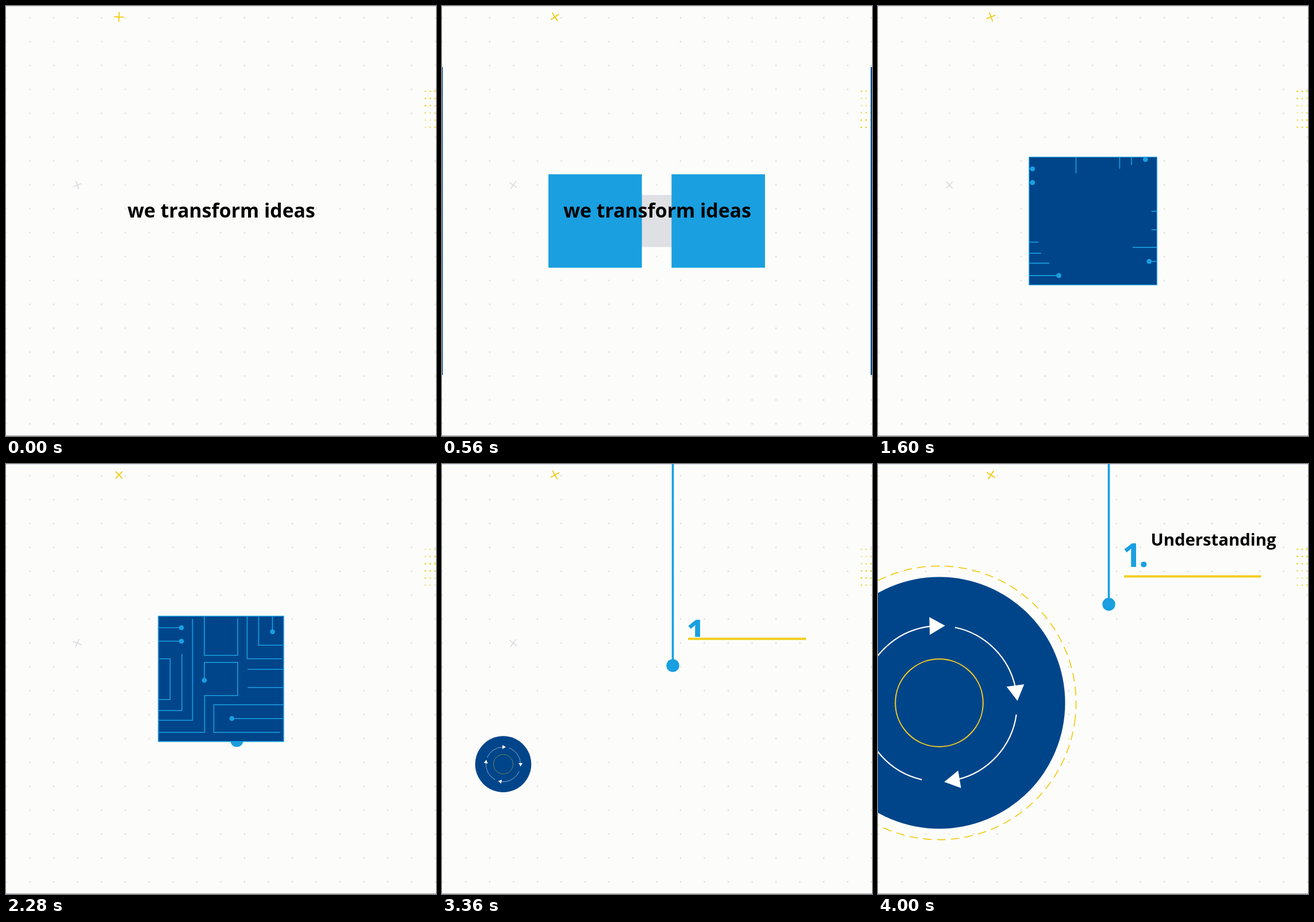
Recreate the animation shown at these times as an HTML page. Size 748 px wide and 748 px high, loop 4.04 s.

```html
<!DOCTYPE html>
<html lang="en">
<head>
<meta charset="utf-8">
<title>We transform ideas</title>
<style>
html, body { margin: 0; width: 100%; height: 100%; overflow: hidden; background: #fcfdfb; }
svg { display: block; width: 100vw; height: 100vh; }
text { font-family: "Open Sans", "Noto Sans", sans-serif; font-weight: 700; }
.dark { fill: #00458a; }
.sky { fill: #1a9fe0; }
.grey { fill: #dfe0e3; }
.trace { fill: none; stroke: #1a9fe0; stroke-width: 1.6; }
.gold { fill: none; stroke: #f3cd22; stroke-width: 2; }
.white { fill: none; stroke: #fff; stroke-width: 2.2; }
</style>
</head>
<body>
<svg viewBox="0 0 748 748">
  <defs>
    <pattern id="grid" x="-20.75" y="0" width="41.5" height="41.55" patternUnits="userSpaceOnUse">
      <circle cx="20.75" cy="20.5" r="1.6" fill="#e3e4dc"/>
    </pattern>
    <clipPath id="above"><rect x="420" y="740" width="60" height="114"/></clipPath>
  </defs>
  <rect width="748" height="748" fill="#fcfdfb"/>
  <rect width="748" height="748" fill="url(#grid)"/>
  <rect width="748" height="1" fill="#d3d3ee"/>
  <rect y="747" width="748" height="1" fill="#98989e"/>
  <path id="plusGold" class="gold" d="M-8.5 0H8.5M0-8.5V8.5"/>
  <path id="plusGrey" fill="none" stroke="#dcdde1" stroke-width="1.7" d="M-8 0H8M0-8V8"/>
  <g id="matrix" fill="#ecd43a"></g>
  <g id="squares"></g>
  <g id="world">
    <path id="stem" fill="none" stroke="#1a9fe0" stroke-width="3.6"/>
    <circle id="ball" class="sky" cx="401.5" r="11.2"/>
    <g id="chip">
      <rect id="board" class="dark" x="-109" y="-109" width="218" height="218" stroke="#1a9fe0"/>
      <g id="traces" transform="translate(-109 -109)"></g>
    </g>
    <rect id="rule" x="428" height="4" fill="#f3cd22"/>
    <g clip-path="url(#above)">
      <text id="number" class="sky" x="425" font-size="58" letter-spacing="-4">1.</text>
    </g>
    <text id="title" x="474.5" y="801.5" font-size="29.3"></text>
    <g id="wheel">
      <circle id="ring" class="gold" stroke-dasharray="15 9" style="stroke-width:1.8"/>
      <g id="disc">
        <circle class="dark" r="219"/>
        <circle class="gold" r="76.3"/>
        <g id="arrows"></g>
      </g>
    </g>
  </g>
  <text id="slogan" text-anchor="middle" y="12" font-size="33.8">we transform ideas</text>
</svg>
<script>
const LOOP = 4040, STEP = 40;
const $ = id => document.getElementById(id);

function set(el, attrs) {
  for (const key in attrs) el.setAttribute(key, attrs[key]);
  return el;
}
function add(parent, tag, attrs) {
  const el = document.createElementNS("http://www.w3.org/2000/svg", tag);
  parent.appendChild(set(el, attrs));
  return el;
}

const span = (t, from, to) => Math.min(1, Math.max(0, (t - from) / (to - from)));
const outCubic = u => 1 - (1 - u) ** 3;
const inOutCubic = u => u < .5 ? 4 * u ** 3 : 1 - 4 * (1 - u) ** 3;
const inOutSine = u => (1 - Math.cos(Math.PI * u)) / 2;
const outExpo = u => u < 1 ? 1 - 2 ** (-10 * u) : 1;
const outBack = u => 1 + 2.2 * (u - 1) ** 3 + 1.2 * (u - 1) ** 2;

// Pairs of squares fly in from both sides, one colour after another
const pairs = ["grey", "sky", "dark"].map((name, i) => ({
  end: 773 + 275 * i,
  sides: [-1, 1].map(side => ({ side, el: add($("squares"), "rect", { class: name }) }))
}));

// Circuit traces; those flagged carry a dot at the growing end
const traces = [
  ["M0 20H41", 1], ["M0 43.5H41", 1],
  ["M0 181H59.5V0"], ["M0 145H20.5V74H0"], ["M0 164H41V63"],
  ["M80 0V68H138V0"],
  ["M0 202H80.5V138H138V80.5H80V118.5", 1],
  ["M154.5 0V74H218"], ["M174.5 0V50.5H218"], ["M198.5 0V27.5", 1],
  ["M218 92.5H154"], ["M218 124H154"],
  ["M218 154H96.5V202H218"], ["M218 178H126", 1]
].map(([d, dotted]) => {
  const path = add($("traces"), "path", { d, class: "trace", pathLength: 1 });
  const dot = dotted && add($("traces"), "circle", { r: 4.3, class: "sky" });
  return { path, dot, length: path.getTotalLength() };
});

const cells = [];
for (let row = 0; row < 6; row++)
  for (let col = 0; col < 3; col++)
    cells.push({ row, col, el: add($("matrix"), "circle", { cx: 729.5 + 8.3 * col, cy: 148.3 + 12.5 * row, r: 1.6 }) });

// Four curved arrows: start angle and tip angle
const polar = (deg, r) => [r * Math.cos(deg * Math.PI / 180), r * Math.sin(deg * Math.PI / 180)];
for (const [start, tip] of [[-118, -41.4], [-31.6, 47], [63.3, 147], [157, 235]]) {
  const r = 135.5, middle = tip - 6;
  add($("arrows"), "path", { class: "white", d: `M${polar(start, r)}A${r} ${r} 0 0 1 ${polar(tip - 10, r)}` });
  add($("arrows"), "path", { fill: "#fff", d: "M-15.5-13.5H15.5L0 13.5Z", transform: `rotate(${middle}) translate(${r} 0)` });
}

function drawBackground(t) {
  const turn = t * .0978;
  set($("plusGold"), { transform: `translate(196.5 19) rotate(${2 + turn})` });
  set($("plusGrey"), { transform: `translate(124 311.5) rotate(${70 + turn})` });
  for (const { row, col, el } of cells)
    set(el, { opacity: .72 + .28 * Math.sin(t / 210 + row * 1.1 + col * .6) });
}

function drawSquares(t) {
  set($("squares"), { display: t < 1323 ? "inline" : "none" });
  for (const { end, sides } of pairs) {
    const offset = 640 * (Math.max(0, end - t) / 763) ** 4;
    const size = 87.6 + .7 * offset;
    for (const { side, el } of sides)
      set(el, { x: 373.5 + side * offset - size / 2, y: 374 - size / 2, width: size, height: size });
  }
  const scale = 1 - span(t, 600, 1210) ** 3;
  set($("slogan"), { transform: `translate(374.5 356) scale(${scale})` });
}

function drawChip(t) {
  const scale = .402 + .598 * outBack(span(t, 1300, 1680));
  set($("chip"), { display: t < 1323 ? "none" : "inline", transform: `translate(374 374) scale(${scale})` });
  set($("board"), { "stroke-width": 1.6 * span(t, 1450, 1650) });
  const grown = outCubic(span(t, 1550, 2550));
  set($("traces"), { display: grown > 0 ? "inline" : "none" });
  for (const { path, dot, length } of traces) {
    set(path, { "stroke-dasharray": `${grown} 2` });
    if (dot) {
      const p = path.getPointAtLength(length * grown);
      set(dot, { cx: p.x, cy: p.y });
    }
  }
}

function drawStep(t) {
  const scroll = 660 * inOutCubic(span(t, 2198, 3967));
  set($("world"), { transform: `translate(0 ${-scroll})` });

  const ballY = 457 + 447 * inOutSine(span(t, 2160, 2960));
  const shown = t >= 2160 ? "inline" : "none";
  set($("ball"), { cy: ballY, display: shown });
  set($("stem"), { d: `M401.5 450V${ballY}`, display: shown });

  set($("rule"), {
    y: 853.5 + 90 * (1 - outCubic(span(t, 2950, 3520))),
    width: t < 2960 ? 0 : 3 + 235.5 * inOutCubic(span(t, 2950, 3560))
  });
  set($("number"), { y: 839 + 60 * (1 - outCubic(span(t, 3220, 3800))) });
  $("title").textContent = "Understanding".slice(0, Math.max(0, Math.floor((t - 3360) / 40)));

  const grow = outExpo(span(t, 3340, 3890));
  const ring = 238 * outBack(span(t, 3340, 4000));
  set($("wheel"), { display: t > 3340 ? "inline" : "none", transform: "translate(106.5 1075.5)" });
  set($("disc"), { transform: `scale(${grow})` });
  set($("ring"), { r: Math.max(0, ring), transform: `rotate(${(t - 3680) * .02})` });
  set($("arrows"), { transform: `translate(0 1.5) rotate(${(t - 3680) * .12375})` });
}

const begin = performance.now();
function frame() {
  const elapsed = (performance.now() - begin) % LOOP;
  const t = Math.floor(elapsed / STEP) * STEP;
  drawBackground(t);
  drawSquares(t);
  drawChip(t);
  drawStep(t);
  requestAnimationFrame(frame);
}
frame();
</script>
</body>
</html>
```
